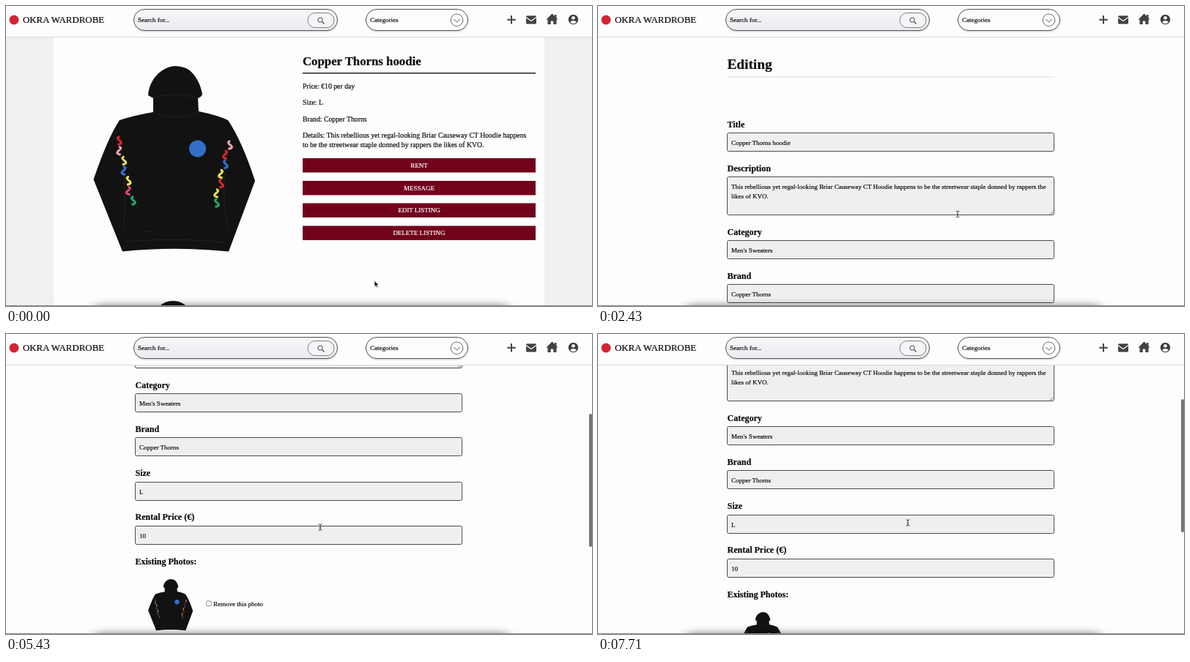
Recreate the animation shown at these times as an HTML page. Size 800 by 410 pixels, loop 8 s.

```html
<!DOCTYPE html>
<html lang="en">
<head>
<meta charset="utf-8">
<title>Garment rental: edit listing</title>
<style>
  html, body { margin: 0; width: 100%; height: 100%; overflow: hidden; background: #fdfdfd; }
  svg { display: block; width: 800px; height: 410px; }
  text { font: 9px "Liberation Serif", serif; fill: #0c0c0c; stroke: #0c0c0c; stroke-width: .2px; white-space: pre; }
  .brand { font-size: 12.9px; }
  .name { font-size: 16.8px; font-weight: bold; }
  .info { font-size: 9.75px; }
  .heading { font-size: 19.3px; font-weight: bold; }
  .label { font-size: 12px; font-weight: bold; }
  .action { fill: #fff; stroke: #fff; text-anchor: middle; }
  .hint { font: 6.7px "Liberation Sans", sans-serif; fill: #f4f4f4; stroke: none; }
  .field { fill: #efefef; stroke: #4c4c4c; }
  .line { fill: none; stroke: #444; }
  .icon { fill: #424242; }
</style>
</head>
<body>
<svg viewBox="0 0 800 410">
  <defs>
    <linearGradient id="pill" x2="0" y2="1">
      <stop offset="0" stop-color="#f6f7f9"/><stop offset="1" stop-color="#e9ebf0"/>
    </linearGradient>
    <filter id="soft" x="-10%" y="-200%" width="120%" height="500%"><feGaussianBlur stdDeviation="8 4"/></filter>
    <filter id="drop"><feDropShadow dx="0" dy="1" stdDeviation=".8" flood-opacity=".2"/></filter>
    <g id="front"></g>
    <g id="back"></g>
  </defs>
  <rect width="800" height="410" fill="#fdfdfd"/>
  <g id="listing"></g>
  <g id="editor"></g>
  <g id="header"></g>
  <rect x="122" y="407" width="562" height="12" opacity=".35" filter="url(#soft)"/>
  <rect y="409" width="800" height="1" fill="#858585"/>
  <rect id="thumb" x="796" width="4" height="182" rx="2" fill="#757575"/>
  <g id="hint">
    <rect x="489" y="310.5" width="49.5" height="11" fill="#323232"/>
    <text class="hint" x="492" y="318.4">No file chosen</text>
  </g>
  <g id="arrow"><path d="M0 0V8.2L1.9 6.5 3.2 9.3 4.6 8.7 3.4 6H5.9Z" fill="#111" stroke="#fff" stroke-width=".6"/></g>
  <g id="hand"><path d="M-.9 .8Q0-.5 .9 .8V3.2L4 4Q5 4.3 4.8 5.6L4 9H-.9L-3.2 5.5Q-3 4.3-1.8 5L-.9 5.8Z" fill="#fff" stroke="#222" stroke-width=".8"/></g>
  <g id="beam"><path d="M-2.4-4.2Q-.3-4.2 0-3 .3-4.2 2.4-4.2M0-3V3M-2.4 4.2Q-.3 4.2 0 3 .3 4.2 2.4 4.2M-1 1H1" fill="none" stroke="#222" stroke-width=".9"/></g>
</svg>
<script>
const $ = id => document.getElementById(id);
const LOOP = 8000, FPS = 7, OPEN_EDITOR = 1850;
const text = (x, y, value, kind = '') => `<text x="${x}" y="${y}" class="${kind}">${value}</text>`;
const rect = (x, y, w, h, rest) => `<rect x="${x}" y="${y}" width="${w}" height="${h}" ${rest}/>`;
const path = (d, rest) => `<path d="${d}" ${rest}/>`;

const SHADES = ['#d8252f', '#f0a0b8', '#e8dc4e', '#2f74cf', '#f0e45a', '#df4a72', '#25a766'];
const BLACK = '#121212';

// A run of small coloured flecks down a sleeve.
function flecks(x0, y0, x1, y1, size, shades) {
  return shades.map((shade, i) => {
    const k = i / (shades.length - 1), x = x0 + (x1 - x0) * k, y = y0 + (y1 - y0) * k;
    const turn = i % 2 ? size : -size;
    return path(`M${x - turn * .4} ${y - size}q${turn} ${size * .3} 0 ${size}t${turn * .5} ${size}`,
      `fill="none" stroke="${shade}" stroke-width="${size * .55}"`);
  }).join('');
}

$('front').innerHTML =
  path('M194 122C195 108 202 96 212 89Q222 82 231 82Q246 83 252 89C260 97 266 108 268 121Q266 125 262 126L263 144Q288 149 303 156Q322 184 340 239L304 335.500Q230 328 159 335.500L119.500 237Q139 180 155 156Q177 149 201 145L201 126Z', `fill="${BLACK}"`) +
  path('M202 126Q230 116 262 126M203 146Q232 158 263 145M158 190Q166 255 160 310M304 190Q290 250 305 312M164 322Q232 316 300 323M190 308h12', 'fill="none" stroke="#222" stroke-width="1"') +
  flecks(153, 184, 172, 266, 5.5, SHADES) +
  flecks(304, 190, 286, 269, 5.5, [SHADES[1], SHADES[0], ...SHADES.slice(3, 5), SHADES[0], SHADES[2], SHADES[6]]) +
  '<circle cx="261.500" cy="195" r="11.500" fill="#316fcb"/>';

$('back').innerHTML =
  path('M214 684C214 674 218 670 225 669C232 670 236 675 236 684L248 688C256 700 260 715 263 731L258 737 247 735V739Q225 736 203 739V735L192 737 187 731C190 714 194 699 202 688Z', `fill="${BLACK}"`) +
  flecks(198, 704, 191, 727, 1.7, SHADES) + flecks(251, 704, 259, 727, 1.7, SHADES) +
  '<circle cx="223" cy="708" r="11" fill="#316fcb"/>';

$('header').innerHTML =
  rect(0, 0, 800, 42, 'fill="#fdfdfd"') + rect(0, 42, 800, 1, 'fill="#d9d9d9"') +
  '<circle cx="11" cy="19" r="6.500" fill="#d22630"/>' + text(23, 23.3, 'OKRA WARDROBE', 'brand') +
  rect(174.5, 4.5, 278, 29, 'rx="14.5" fill="url(#pill)" stroke="#555" filter="url(#drop)"') +
  text(180, 22.3, 'Search for...') +
  rect(412, 9.5, 36, 20, 'rx="10" fill="#f4f5f7" stroke="#666" stroke-width=".8"') +
  '<circle class="line" cx="429" cy="19" r="3.200"/>' + path('M431.500 21.500L434.500 24.500', 'class="line" stroke-width="1.3"') +
  rect(491.5, 4.5, 139, 29, 'rx="14.5" fill="#fdfdfd" stroke="#555" filter="url(#drop)"') +
  text(497, 22.3, 'Categories') +
  '<circle class="line" cx="615.500" cy="19.300" r="8.300" stroke-width=".8"/>' + path('M611.500 18l4 4 4-4', 'class="line"') +
  path('M690 13v11.500M684.200 18.700h11.600', 'class="line" stroke-width="2"') +
  rect(710, 13.3, 14, 11.2, 'rx="1.6" class="icon"') + path('M710 15.500l7 5 7-5', 'fill="none" stroke="#fff" stroke-width="1.2"') +
  path('M737.500 18.500L745.500 10.500l3.500 3.200V12h2.500v4.600l2 1.900H751.500V25H747.300V20.500H743.700V25H739.500V18.500Z', 'class="icon"') +
  '<circle class="icon" cx="774.500" cy="18.500" r="6.800"/><circle cx="774.500" cy="16.300" r="2.300" fill="#fff"/>' +
  path('M770.300 22.500Q771 20 774.500 20T778.700 22.500Q774.500 26 770.300 22.500Z', 'fill="#fff"');

const BUTTONS = [['RENT', 208], ['MESSAGE', 239], ['EDIT LISTING', 269.5], ['DELETE LISTING', 300.5]];
const blurb = 'This rebellious yet regal-looking Briar Causeway CT Hoodie happens';

$('listing').innerHTML =
  rect(0, 43, 800, 367, 'fill="#f0f0f0"') + rect(65, 43, 670, 367, 'fill="#fdfdfd"') +
  '<use href="#front"/>' + path('M210 410Q217 403 228 403T246 410Z', `fill="${BLACK}"`) +
  text(405, 81.3, 'Copper Thorns hoodie', 'name') + rect(405, 91, 318, 1.5, 'fill="#222"') +
  [[113, 'Price: €10 per day'], [135.3, 'Size: L'], [157.5, 'Brand: Copper Thorns'],
   [179.7, 'Details: ' + blurb], [193, 'to be the streetwear staple donned by rappers the likes of KVO.']]
    .map(([y, value]) => text(405, y, value, 'info')).join('') +
  BUTTONS.map(([value, y]) =>
    rect(405, y, 318, 19.5, 'class="button" fill="#72021c"') + text(564, y + 12.6, value, 'action')).join('');

// Label, label baseline, field top, field height, lines of content.
const FIELDS = [
  ['Title', 166, 173.5, 25, 'Copper Thorns hoodie'],
  ['Description', 226, 233.5, 52, blurb + ' to be the streetwear staple donned by rappers the', 'likes of KVO.'],
  ['Category', 313, 320.5, 25, "Men's Sweaters"],
  ['Brand', 373, 380.5, 25, 'Copper Thorns'],
  ['Size', 433, 441.5, 25, 'L'],
  ['Rental Price (€)', 493, 501.5, 25, '10']
];
const removeOption = y => rect(273.8, y - 7, 6.6, 6.6, 'rx="1" fill="#fff" stroke="#777" stroke-width=".8"') +
  text(283, y, 'Remove this photo');

$('editor').innerHTML =
  text(176.5, 86, 'Editing', 'heading') + rect(177, 96.5, 446, 1, 'fill="#dedede"') +
  FIELDS.map(([label, base, top, height, ...lines]) =>
    text(176.5, base, label, 'label') +
    rect(176.5, top, 446, height, 'rx="2" class="field"') +
    lines.map((line, i) => text(182, top + 16 + i * 13.2, line)).join('')).join('') +
  path('M617 284.500l4-4M619.500 284.500l1.500-1.500', 'class="line" stroke-width=".7"') +
  text(176.5, 554, 'Existing Photos:', 'label') +
  '<use href="#front" transform="translate(161 551.200) scale(.277)"/>' + removeOption(611) +
  '<use href="#back"/>' + removeOption(706) +
  text(176.5, 760, 'Upload Photos (optional)');

// Each key: time, value, ...
const POINTER = [[0, 503, 375.5], [140, 503, 375.5], [860, 490.5, 287], [1860, 490.5, 287], [2430, 491, 284.5],
  [2570, 491, 284.5], [3290, 429, 264], [6860, 429, 264], [7430, 423, 258]];
const SCROLL = [[3290, 0], [3570, 72], [3710, 118], [4000, 176], [4290, 200], [4710, 200], [5000, 211],
  [5430, 239], [5860, 290], [6430, 347], [6860, 356], [7140, 310], [7430, 235], [7710, 194]];

function sample(keys, t) {
  const next = keys.findIndex(key => key[0] > t);
  if (next === 0) return keys[0].slice(1);
  if (next < 0) return keys.at(-1).slice(1);
  const a = keys[next - 1], b = keys[next], k = (t - a[0]) / (b[0] - a[0]);
  return a.slice(1).map((v, i) => v + (b[i + 1] - v) * k);
}

const show = (id, on) => $(id).style.display = on ? '' : 'none';
const buttons = [...document.querySelectorAll('.button')];

function draw(now) {
  // The screen refreshes seven times a second.
  const t = Math.floor((now % LOOP + 6) * FPS / 1000) * 1000 / FPS;
  const editing = t >= OPEN_EDITOR;
  const [x, y] = sample(POINTER, t), scroll = Math.round(sample(SCROLL, t)[0]);
  show('listing', !editing);
  show('editor', editing);
  $('editor').setAttribute('transform', `translate(0 ${-scroll})`);
  show('thumb', scroll > 0);
  $('thumb').setAttribute('y', 2.4 + scroll * .446);
  show('hint', t >= 1280 && !editing);

  const hovered = editing ? -1 : BUTTONS.findIndex(([, top]) => y >= top && y <= top + 19.5);
  buttons.forEach((button, i) => button.setAttribute('fill', i === hovered ? '#a80f1b' : '#72021c'));
  const overField = editing && FIELDS.some(([, , top, height]) => y + scroll >= top - .5 && y + scroll <= top + height + .5);
  const shape = hovered >= 0 ? 'hand' : overField ? 'beam' : 'arrow';
  for (const id of ['arrow', 'hand', 'beam']) show(id, id === shape);
  $(shape).setAttribute('transform', `translate(${x} ${y})`);
}

const start = performance.now();
function tick() {
  draw(performance.now() - start);
  requestAnimationFrame(tick);
}
tick();
</script>
</body>
</html>
```
